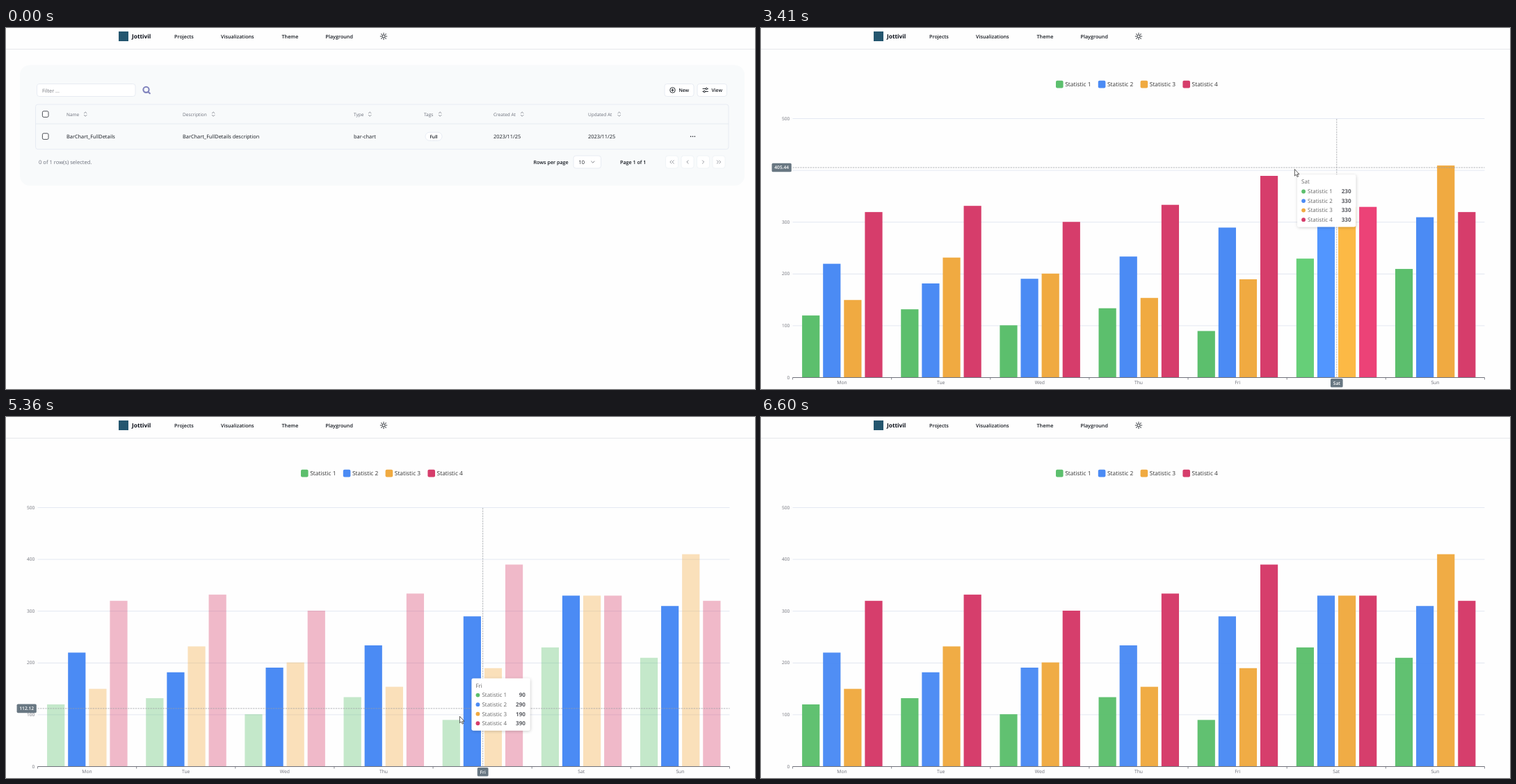
Animation, 1077 px wide and 520 px high, one loop 7.26 s. Source, as an HTML page:

```html
<!DOCTYPE html>
<html lang="en">
<head>
<meta charset="utf-8">
<title>Bar chart</title>
<style>
html, body { margin: 0; width: 100%; height: 100%; overflow: hidden; background: #fefefe; }
svg { display: block; width: 1077px; height: 520px; font-family: "Open Sans", "Noto Sans", sans-serif; text-rendering: geometricPrecision; }
</style>
</head>
<body>
<svg id="stage" viewBox="0 0 1077 520"></svg>
<script>
const LOOP = 7260, CHART_AT = 2440, GROW_AT = 2525, POINTER_ON = 2510, POINTER_OFF = 6350;
const LEFT = 45.5, RIGHT = 1040.5, BASE = 503.5, UNIT = 0.746, BAND = (RIGHT - LEFT) / 7, BAR = 25.2;
const MOUSE_DELAY = 60, TAU = 90;
const INK = '#14181f', GRAY = '#6b6f7a', LINE = '#e2e8f0', AXIS = '#6e7079';
const DAYS = ['Mon', 'Tue', 'Wed', 'Thu', 'Fri', 'Sat', 'Sun'];
const SERIES = [
  { color: '#5cbf6d', bright: '#66cf78', data: [120, 132, 101, 134, 90, 230, 210] },
  { color: '#4b8bf4', bright: '#5296ff', data: [220, 182, 191, 234, 290, 330, 310] },
  { color: '#f0aa41', bright: '#fcb945', data: [150, 232, 201, 154, 190, 330, 410] },
  { color: '#d63d6b', bright: '#ec4277', data: [320, 332, 301, 334, 390, 330, 320] }
];
// Cursor key points: time, x, y
const PATH = [
  [130, 1050, 486], [640, 1004, 118], [830, 989, 150], [1310, 989, 150], [1640, 950, 181],
  [2430, 950, 181], [2590, 858, 164.45], [2650, 851, 165], [3200, 742, 195], [3450, 772, 205],
  [3760, 738, 216], [4020, 735, 217.65], [4340, 735, 217.65], [5000, 672, 390],
  [5300, 656.5, 419.67], [5360, 651.5, 431], [5620, 888, 468], [5830, 910, 474],
  [6010, 972.3, 479.65], [6070, 978, 481], [6400, 1068, 508]
];

const clamp = (v, a = 0, b = 1) => Math.min(b, Math.max(a, v));
const within = (t, a, b) => t >= a && t < b;

function cursorAt(t) {
  const i = clamp(PATH.findIndex(k => k[0] > t), 1, PATH.length - 1);
  const [t0, x0, y0] = PATH[i - 1], [t1, x1, y1] = PATH[i];
  const p = clamp((t - t0) / (t1 - t0));
  return [x0 + (x1 - x0) * p, y0 + (y1 - y0) * p];
}
const mouseAt = t => cursorAt(t - MOUSE_DELAY);

// Exponential follow: weighted mean of the vector f over the recent past
function follow(f, t) {
  let sum = [], total = 0;
  for (let s = 5; s < 6 * TAU; s += 10) {
    const w = Math.exp(-s / TAU);
    f(t - s).forEach((v, i) => sum[i] = (sum[i] || 0) + v * w);
    total += w;
  }
  return sum.map(v => v / total);
}

const barX = (i, d) => LEFT + d * BAND + 13.6 + i * 30.1;
const dayAt = x => clamp(Math.floor((x - LEFT) / BAND), 0, 6);

// Index of the series under the mouse, or -1
function focusAt(t) {
  if (!within(t, CHART_AT, POINTER_OFF)) return -1;
  const [x, y] = mouseAt(t), d = dayAt(x);
  return SERIES.findIndex((s, i) => within(x, barX(i, d), barX(i, d) + BAR) && within(y, BASE - s.data[d] * UNIT, BASE));
}
function opacities(t) {
  const focus = focusAt(t);
  return SERIES.map((s, i) => focus < 0 || focus === i ? 1 : .1);
}
function tipTarget(t) {
  const [x, y] = cursorAt(t);
  return [Math.min(x + 12, 958.5), y > 419 ? y - 87 : y + 11.5];
}

const text = (x, y, s, size = 7.4, fill = INK, weight = 400, anchor = 'start', more = '') =>
  `<text x="${x}" y="${y}" font-size="${size}" fill="${fill}" font-weight="${weight}" text-anchor="${anchor}" ${more}>${s}</text>`;
const box = (x, y, w, h, r = 3.4, fill = '#fff', stroke = LINE, more = '') =>
  `<rect x="${x}" y="${y}" width="${w}" height="${h}" rx="${r}" fill="${fill}" stroke="${stroke}" stroke-width=".8" ${more}/>`;
const path = (d, stroke = INK, width = .9, more = '') =>
  `<path d="${d}" fill="none" stroke="${stroke}" stroke-width="${width}" stroke-linecap="round" stroke-linejoin="round" ${more}/>`;
const ring = (x, y, r, stroke = INK, width = .9) =>
  `<circle cx="${x}" cy="${y}" r="${r}" fill="none" stroke="${stroke}" stroke-width="${width}"/>`;

function header() {
  let rays = '';
  for (let a = 0; a < 360; a += 45) rays += path('M546.8 12h.9', INK, 1, `transform="rotate(${a} 543 12)"`);
  const nav = [[242, 'Projects'], [309, 'Visualizations'], [396.5, 'Theme'], [459.5, 'Playground']];
  return '<rect x="162" y="5" width="14" height="14" fill="#24566f"/>' +
    text(181, 15.2, 'Jottivil', 8.3, '#0b0f19', 700) +
    nav.map(([x, s]) => text(x, 14.7, s, 7.2, INK, 600)).join('') +
    ring(543, 12, 2.2, INK, 1) + rays + '<path d="M0 30.5H1077" stroke="#e5e7eb"/>';
}

function toolbar() {
  return box(44.5, 80.5, 141.5, 18) + text(52, 92.7, 'Filter ...', 7.3, '#73767d') +
    ring(201.5, 88.8, 4.1, '#8083bd', 2.1) + path('M204.8 92.2l2 2', '#8083bd', 2.2) +
    box(947, 80.5, 42, 18) + ring(958.5, 89.5, 3.8) + path('M956.7 89.5h3.6M958.5 87.7v3.6') +
    text(967.5, 92.2, 'New', 6.8, INK, 600) +
    box(994, 80.5, 42.5, 18) + path('M1002 87.5h4M1008.6 87.5h.8M1002 91.5h1M1005.4 91.5h4') +
    ring(1007.2, 87.5, 1.3) + ring(1004.2, 91.5, 1.3) + text(1014.5, 92.2, 'View', 6.8, INK, 600);
}

function grid() {
  const columns = [
    [87, 'Name', 114, 'BarChart_FullDetails'], [254, 'Description', 298, 'BarChart_FullDetails description'],
    [500, 'Type', 523, 'bar-chart'], [601, 'Tags', 624, ''],
    [701, 'Created At', 742, '2023/11/25'], [837, 'Updated At', 881.5, '2023/11/25']
  ];
  return box(42.5, 110, 996.5, 64.7, 3.5, '#f8fafb') +
    '<rect id="row" x="43" y="138.4" width="995.5" height="35.8" fill="#f5f7f8"/>' +
    `<path d="M42.5 138H1039" stroke="${LINE}" stroke-width=".9"/>` +
    [124, 156].map(y => box(52.4, y - 4.2, 8.6, 8.6, 1.8, '#fff', '#20242c')).join('') +
    columns.map(([x, head, c, cell]) => text(x, 126.5, head, 6.5, GRAY, 500) + text(x, 158.8, cell) +
      path(`M${c - 1.6} 122.8l1.8-1.8 1.8 1.8m-3.6 2.6l1.8 1.8 1.8-1.8`, GRAY, .75)).join('') +
    box(603, 150.2, 24, 12, 6) + text(615, 158.6, 'Full', 6.5, INK, 600, 'middle') +
    path('M984.6 156.2h0m2.9 0h0m2.9 0h0', INK, 1.6);
}

function footer() {
  const chevron = (x, dir) => `M${x - dir * 1.1} 190.8l${dir * 2.2} 2.2 ${-dir * 2.2} 2.2`;
  const icons = [[-1.6, 1.6].map(o => chevron(957.5 + o, -1)).join(''), chevron(980, -1),
    chevron(1002.5, 1), [-1.6, 1.6].map(o => chevron(1025 + o, 1)).join('')];
  return text(47, 195.6, '0 of 1 row(s) selected.', 7.6, GRAY) +
    text(758.5, 195.6, 'Rows per page', 7.15, INK, 600) + text(883, 195.6, 'Page 1 of 1', 7.15, INK, 600) +
    box(816, 184, 39.5, 18) + text(823.5, 195.6, '10') + path('M841.6 192l2.2 2.2 2.2-2.2', '#73767d') +
    icons.map((d, i) => box(948.5 + i * 22.5, 184, 18, 18, 3.4, '#fff', '#edf1f5') + path(d, '#8b8e95')).join('');
}

function menu() {
  return '<g id="menu">' + box(906, 169.5, 91, 41, 3.4, '#fff', LINE, 'filter="url(#shade)"') +
    '<rect id="item" x="908.5" y="172" width="86" height="18" rx="2" fill="#f1f5f9"/>' +
    text(913, 183.6, 'View') + text(913, 201.6, 'Delete') + '</g>';
}

function chart() {
  let s = '';
  SERIES.forEach(({ color }, i) => {
    const x = 424 + i * 60.8;
    s += `<rect x="${x}" y="75.8" width="10.6" height="10.6" rx="2" fill="${color}"/>` +
      text(x + 13.2, 84.3, 'Statistic ' + (i + 1), 8.4, '#333');
  });
  for (let v = 0; v <= 500; v += 100) {
    const y = BASE - v * UNIT;
    if (v) s += `<path d="M${LEFT} ${y}H${RIGHT}" stroke="#e0e6f1" stroke-width=".9"/>`;
    s += text(41.3, y + 2.1, v, 6.6, AXIS, 400, 'end');
  }
  SERIES.forEach((_, i) => DAYS.forEach((_, d) => s += `<rect class="bar" x="${barX(i, d)}" width="${BAR}"/>`));
  s += `<path d="M${LEFT} ${BASE}H${RIGHT}" stroke="${AXIS}"/>`;
  for (let d = 0; d <= 7; d++) s += `<path d="M${LEFT + d * BAND} ${BASE}v3" stroke="${AXIS}" stroke-width=".8"/>`;
  DAYS.forEach((n, d) => s += text(LEFT + (d + .5) * BAND, 513.2, n, 6.8, AXIS, 400, 'middle'));
  return s;
}

function pointer() {
  const dash = 'fill="none" stroke="#9a9ca2" stroke-width=".75" stroke-dasharray="2.3 1.3"';
  const tag = (id, y) => `<rect id="${id}Box" y="${y}" height="12.6" rx="1.7" fill="#687782"/>` +
    text(0, y + 8.5, '', 6.6, '#fff', 600, 'middle', `id="${id}Text"`);
  return `<g id="pointer"><path id="vline" ${dash}/><path id="hline" ${dash}/>` +
    tag('day', 505) + '<g id="level">' + tag('value', -6.3) + '</g></g>';
}

function tooltip() {
  return '<g id="tip"><rect width="84" height="75.3" rx="2.4" fill="#fff" filter="url(#shade)"/>' +
    text(6, 13.2, '', 8, '#666', 400, 'start', 'id="tipDay"') +
    SERIES.map(({ color }, i) => {
      const y = 24.2 + i * 13.55;
      return `<circle cx="9" cy="${y}" r="2.9" fill="${color}"/>` + text(15, y + 2.9, 'Statistic ' + (i + 1), 8, '#666') +
        text(77.5, y + 2.9, '', 8.1, '#5c5e64', 700, 'end', 'class="tipValue"');
    }).join('') + '</g>';
}

const stage = document.getElementById('stage');
stage.innerHTML =
  '<defs><filter id="shade" x="-20%" y="-20%" width="140%" height="150%">' +
  '<feDropShadow dx=".6" dy="1" stdDeviation="2" flood-color="#000" flood-opacity=".2"/></filter></defs>' +
  header() +
  '<g id="table"><rect x="20" y="53.5" width="1042" height="173.5" rx="14" fill="#f8fafb"/>' +
  toolbar() + grid() + footer() + menu() + '</g>' +
  '<g id="chart">' + chart() + pointer() + tooltip() + '</g>' +
  '<g id="cursor"><circle id="click" r="7.2" fill="#fff04a" fill-opacity=".8"/>' +
  '<g fill="#fff" stroke="#333" stroke-width=".8" stroke-linejoin="round">' +
  '<path id="arrow" d="M0 0V9.6L2.2 7.6 3.8 11 5.3 10.3 3.8 7.1H6.6Z"/>' +
  '<path id="hand" d="M-.9 7V1Q0-.4 .9 1V4.6Q1.9 3.8 2.6 4.9Q3.7 4.2 4.3 5.3Q5.5 4.8 5.7 6.2V8.6Q5.6 10.4 4.6 11.8H.2Q-1.2 9.8-3 7.6Q-2.8 6.2-.9 7.6Z"/></g></g>';

const el = {};
stage.querySelectorAll('[id]').forEach(n => el[n.id] = n);
const bars = stage.querySelectorAll('.bar');
const tipValues = stage.querySelectorAll('.tipValue');

const set = (n, attrs) => { for (const k in attrs) n.setAttribute(k, attrs[k]); };
const show = (n, on) => { n.style.display = on ? '' : 'none'; };
const move = (n, x, y) => set(n, { transform: `translate(${x} ${y})` });

function drawCursor(t) {
  const [x, y] = cursorAt(t), hand = focusAt(t) >= 0;
  show(el.cursor, within(t, 130, 6400));
  move(el.cursor, x, y);
  show(el.hand, hand);
  show(el.arrow, !hand);
  show(el.click, within(t, 1250, 1400) || within(t, 1710, 1850));
  show(el.row, within(t, 130, 1850) && within(y, 138, 174));
  show(el.menu, within(t, 1320, 1850));
  show(el.item, y > 172);
}

function drawBars(t, day, lit) {
  const grow = 1 - (1 - clamp((t - GROW_AT) / 1000)) ** 3;
  const fade = follow(opacities, t);
  bars.forEach((bar, n) => {
    const i = Math.floor(n / 7), d = n % 7, s = SERIES[i], h = s.data[d] * UNIT * grow;
    set(bar, { y: BASE - h, height: h, opacity: fade[i], fill: lit && d === day ? s.bright : s.color });
  });
}

// Fill a tag; align 0.5 centres it on x, 1 puts its right edge there
function label(id, s, x, align) {
  const t = el[id + 'Text'];
  t.textContent = s;
  const w = t.getComputedTextLength() + 7.6;
  set(el[id + 'Box'], { x: x - w * align, width: w });
  set(t, { x: x + w * (.5 - align) });
}

function drawPointer(t, day, y) {
  const x = LEFT + (day + .5) * BAND + .5;
  set(el.vline, { d: `M${x} 131V${BASE}` });
  set(el.hline, { d: `M${LEFT} ${y}H${RIGHT}` });
  label('day', DAYS[day], x, .5);
  move(el.level, 0, y);
  label('value', ((BASE - y) / UNIT).toFixed(2), 43.8, 1);
  move(el.tip, ...follow(tipTarget, t));
  el.tipDay.textContent = DAYS[day];
  tipValues.forEach((n, i) => n.textContent = SERIES[i].data[day]);
}

const start = performance.now();
function frame() {
  const t = (performance.now() - start) % LOOP;
  const onChart = t >= CHART_AT, pointing = within(t, POINTER_ON, POINTER_OFF);
  show(el.table, !onChart);
  show(el.chart, onChart);
  show(el.pointer, pointing);
  show(el.tip, pointing);
  drawCursor(t);
  if (onChart) {
    const [x, y] = mouseAt(t), day = dayAt(x);
    drawBars(t, day, pointing && y < 300);
    if (pointing) drawPointer(t, day, y);
  }
  requestAnimationFrame(frame);
}
frame();
</script>
</body>
</html>
```
